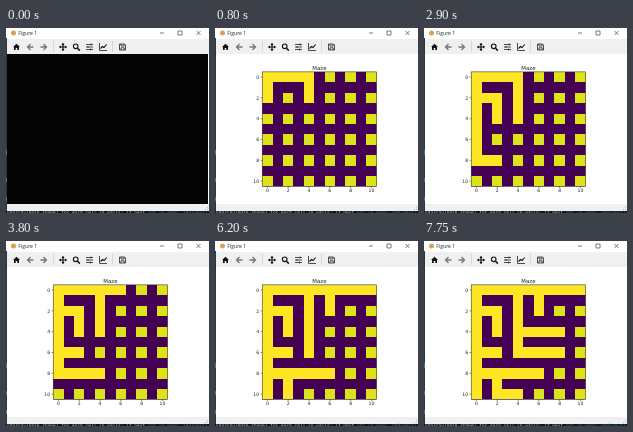
An HTML page for the animation above (8000 ms loop, 203 by 185 pixels).

```html
<!DOCTYPE html>
<html lang="en">
<head>
<meta charset="utf-8">
<title>Maze</title>
<style>
  html, body { margin: 0; width: 100%; height: 100%; overflow: hidden; background: #fff; }
  svg { display: block; width: 203px; height: 185px; }
  .ui { font: 5.1px "Open Sans", sans-serif; fill: #222; }
  .plot { font-family: "DejaVu Sans", sans-serif; fill: #222; }
  .line { fill: none; stroke: #222; stroke-width: .8; }
</style>
</head>
<body>
<svg viewBox="0 0 203 185">
  <rect width="203" height="185" fill="#fff"/>
  <circle cx="7.5" cy="5" r="2.5" fill="#d9a05c"/>
  <text class="ui" x="12.3" y="6.9">Figure 1</text>
  <path d="M154 5h4M172 3h4v4h-4zM190.500 3l4 4m0-4l-4 4" fill="none" stroke="#444" stroke-width=".7"/>

  <rect y="11" width="203" height="15" fill="#f0f0f0"/>
  <path d="M47.500 13v11M106.500 13v11" stroke="#c8c8c8" stroke-width=".6"/>
  <path d="M7 19l3.500-3.300 3.500 3.300h-1v3H11.300v-2H9.700v2H8v-3z" fill="#111"/>
  <path d="M27.500 19h-6m3-3l-3 3 3 3M34.500 19h6m-3-3l3 3-3 3" fill="none" stroke="#777" stroke-width="1.300"/>
  <path d="M53.500 19h7M57 15.500v7" stroke="#111" stroke-width="1.200"/>
  <path d="M53 19l2-1.600v3.200zM61 19l-2-1.600v3.200zM57 15l-1.600 2h3.200zM57 23l-1.600-2h3.200z" fill="#111"/>
  <path d="M71.500 20.300l2.300 2.300" stroke="#111" stroke-width="1.500"/>
  <circle cx="69.700" cy="18.300" r="2.300" fill="none" stroke="#111" stroke-width="1.100"/>
  <path class="line" d="M80 16.500h7M80 19h7M80 21.500h7M85 15.500v2M82 18v2M84.500 20.500v2"/>
  <path class="line" d="M93.500 15v7.500h7.500"/>
  <path d="M94.500 20.500l2-2 1.500 1 2.700-3" fill="none" stroke="#111" stroke-width="1.100"/>
  <path class="line" d="M113.500 16h5l1 1v5h-6zM115 16v2h3v-2M115 22v-2.200h3.200v2.200"/>

  <g id="plot" class="plot"></g>
  <rect id="blank" x="1" y="26" width="201" height="150" fill="#050505"/>

  <rect y="176" width="203" height="7" fill="#f0f0f0"/>
  <path d="M199 181.500h1M201 181.500h1M201 179.500h1" stroke="#aaa" stroke-width=".8"/>
  <rect y="183" width="203" height="2" fill="#10151c"/>
  <text x="1" y="186.300" font-size="4.500" font-family="'DejaVu Sans Mono', monospace" fill="#c5ccd2">ndarray(maze.shape) for each cell in walls: if next <tspan fill="#367c9e">not in seen: add(next)</tspan></text>
  <path d="M.5 10V183" stroke="#30343a"/>
  <path d="M.5 122v5M.5 150v4M.5 169v4" stroke="#367c9e"/>
</svg>
<script>
const LOOP = 8000, SIZE = 11, CELL = 10.4, LEFT = 47.2, TOP = 43.9;
const VISITED = "#fde725", UNVISITED = "#dde318", WALL = "#440154";
// Time, then the openings as row,column.
const steps = [
  [50, "0,1 0,3"],
  [600, "1,0 1,4"],
  [1100, "3,0 2,1"],
  [1700, "5,0 7,0"],
  [2250, "3,2"],
  [2850, "3,4 8,1"],
  [3500, "0,5 6,1 8,3"],
  [4000, "1,6 9,0"],
  [4600, "8,5"],
  [5150, "0,7 9,2"],
  [5700, "5,4"],
  [6150, "0,9"],
  [6700, "4,5 6,5 10,3"],
  [7250, "4,7 6,7"]
];
const plot = document.getElementById("plot");
const blank = document.getElementById("blank");

function add(tag, attrs, text) {
  const node = document.createElementNS("http://www.w3.org/2000/svg", tag);
  for (const key in attrs) node.setAttribute(key, attrs[key]);
  if (text !== undefined) node.textContent = text;
  return plot.appendChild(node);
}
const colX = c => LEFT + c * CELL;
const rowY = r => TOP + r * CELL;

// An opening lights its own cell and the rooms on both sides.
const litAt = {};
const light = (r, c, at) => litAt[[r, c]] = Math.min(at, litAt[[r, c]] ?? LOOP);
for (const [at, list] of steps)
  for (const pair of list.split(" ")) {
    const [r, c] = pair.split(",").map(Number);
    const dr = r % 2, dc = c % 2;
    for (const k of [-1, 0, 1]) light(r + k * dr, c + k * dc, at);
  }

const side = SIZE * CELL;
add("rect", { x: LEFT, y: TOP, width: side, height: side, fill: WALL });
const cells = [];
for (let r = 0; r < SIZE; r++)
  for (let c = 0; c < SIZE; c++) {
    const room = r % 2 === 0 && c % 2 === 0;
    const node = add("rect", { x: colX(c), y: rowY(r), width: CELL, height: CELL, "shape-rendering": "crispEdges" });
    cells.push({ node, at: litAt[[r, c]] ?? LOOP, closed: room ? UNVISITED : "none" });
  }

add("rect", { x: LEFT, y: TOP, width: side, height: side, fill: "none", stroke: "#222", "stroke-width": .5 });
add("text", { x: LEFT + side / 2, y: 41.8, "font-size": 5.4, "text-anchor": "middle" }, "Maze");
for (let n = 0; n < SIZE; n += 2) {
  const x = colX(n + .5), y = rowY(n + .5), bottom = TOP + side;
  add("path", { d: `M${x} ${bottom}v1.7M${LEFT} ${y}h-1.7`, stroke: "#222", "stroke-width": .5 });
  add("text", { x, y: bottom + 6.1, "font-size": 4.6, "text-anchor": "middle" }, n);
  add("text", { x: LEFT - 3, y: y + 1.7, "font-size": 4.6, "text-anchor": "end" }, n);
}

const start = performance.now();
function draw() {
  const t = Math.max(0, performance.now() - start) % LOOP;
  blank.style.display = t < 50 ? "" : "none";
  for (const { node, at, closed } of cells) node.setAttribute("fill", t >= at ? VISITED : closed);
  requestAnimationFrame(draw);
}
draw();
</script>
</body>
</html>
```
